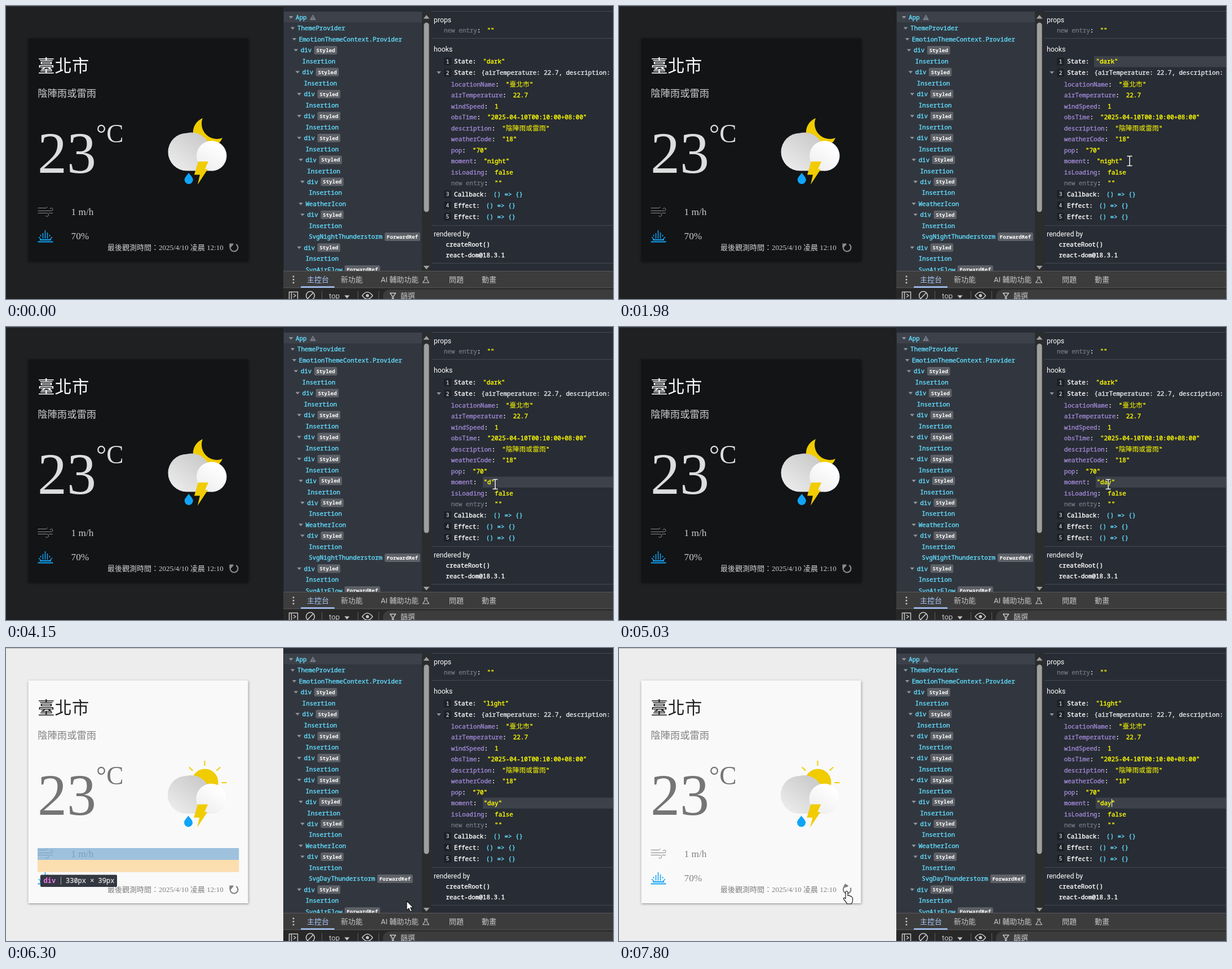
These frames come from a looping animation (1077 px wide and 520 px high, 8 s). An HTML page with a canvas:

```html
<!DOCTYPE html>
<html lang="zh-Hant">
<head>
<meta charset="utf-8">
<style>
html, body { margin: 0; width: 100%; height: 100%; overflow: hidden; background: #282c34; }
canvas { display: block; }
</style>
</head>
<body>
<canvas id="stage" width="1077" height="520"></canvas>
<script>
const g = document.getElementById('stage').getContext('2d');
g.lineJoin = 'round';
const LOOP = 8000;
const CJK = '"Noto Sans CJK TC", "Noto Sans CJK", sans-serif';
const MONO = `"Noto Sans Mono", "DejaVu Sans Mono", ${CJK}, monospace`;
const SERIF = `"Liberation Serif", ${CJK}, serif`;
const UI = `Roboto, ${CJK}`;
const CHAR = 6.54, CYAN = '#61dafb', YELLOW = '#ffff00', BLUE = '#10a4f8', SUN = '#f0cc00';

const themes = {
  dark: { page: '#1f2022', card: '#121416', shadow: '#0e0f11', title: '#f9f9fa', desc: '#cccccc',
    temp: '#dddddd', edge: '#3a3b3d', icon: '#8c8c8c' },
  light: { page: '#ededed', card: '#f9f9f9', shadow: '#888888', title: '#212121', desc: '#828282',
    temp: '#757575', edge: '#b5b5b5', icon: '#828282' }
};

function rect(x, y, w, h, color, r = 0) {
  g.fillStyle = color;
  g.beginPath();
  g.roundRect(x, y, w, h, r);
  g.fill();
}
function circle(x, y, r, color) {
  g.fillStyle = color;
  g.beginPath();
  g.arc(x, y, r, 0, 7);
  g.fill();
}
function fill(d, color) { g.fillStyle = color; g.fill(new Path2D(d)); }
function stroke(d, color, width = 1) {
  g.strokeStyle = color;
  g.lineWidth = width;
  g.stroke(new Path2D(d));
}
function text(s, x, y, font, color) {
  g.font = font;
  g.fillStyle = color;
  g.fillText(s, x, y);
}
// Code text centred on a row, thickened to a medium weight; Chinese runs are slightly larger.
function mono(s, x, cy, color, weight = 400, size = 10.9) {
  for (const run of s.split(/([\u3000-\u9fff]+)/)) {
    const wide = run.charCodeAt(0) > 0x2fff, y = cy + size * 0.36;
    text(run, x, y, `${weight} ${wide ? size * 1.09 : size}px ${MONO}`, color);
    if (weight === 400 && !wide) {
      g.strokeStyle = color;
      g.lineWidth = 0.4;
      g.strokeText(run, x, y);
    }
    x += g.measureText(run).width;
  }
  return x;
}
const toggle = (x, y) => fill(`M${x - 3.8} ${y - 2}h7.6l-3.8 4.4z`, '#8f949d');

function gradient(x0, y0, x1, y1, from, to) {
  const paint = g.createLinearGradient(x0, y0, x1, y1);
  paint.addColorStop(0, from);
  paint.addColorStop(1, to);
  return paint;
}

function drawWeather(day) {
  g.save();
  if (day) {
    circle(353, 238, 23.5, SUN);
    for (const a of [-135, -90, -45, 0]) {
      const c = Math.cos(a * Math.PI / 180), s = Math.sin(a * Math.PI / 180);
      stroke(`M${352.5 + 30 * c} ${239 + 30 * s}L${352.5 + 39 * c} ${239 + 39 * s}`, SUN, 2);
    }
    g.translate(-0.7, 1.5);
  } else {
    fill('M349 199A27 27 0 1 0 384 234A27 27 0 0 1 349 199Z', SUN);
  }
  fill('M321 225.5a33.5 33.5 0 0 0 0 67h40v-45a33.5 33.5 0 0 0-40-22z',
    gradient(300, 285, 340, 232, '#eaeaea', '#cdcdcd'));
  circle(364.8, 266, 26.7, gradient(350, 288, 376, 246, '#efefef', '#ffffff'));
  fill('M341 276h18l-6 13.5h5L340 317l4-17.500h-10z', SUN);
  fill('M324.300 296c3 4.500 7.500 8 7.500 12.500a7.500 7.500 0 0 1-15 0c0-4.500 4.500-8 7.500-12.500z', BLUE);
  g.restore();
}

function drawRefresh(angle, color) {
  g.save();
  g.translate(404.7, 428.7);
  g.rotate(angle);
  g.strokeStyle = color;
  g.lineWidth = 2.2;
  g.beginPath();
  g.arc(0, 0, 6.8, -1, 3.5);
  g.stroke();
  fill('M-8.300-7.300h7v2l-4.500 5h-2.500z', color);
  g.restore();
}

function drawApp(t, day) {
  const c = day ? themes.light : themes.dark;
  rect(0, 0, 492, 520, c.page);
  rect(0, 0, 492, 1, c.edge);
  g.save();
  g.shadowColor = c.shadow;
  g.shadowBlur = 4;
  g.shadowOffsetY = 1;
  rect(39.5, 57.5, 390, 395.5, c.card);
  g.restore();

  text('臺北市', 56.3, 117, `300 30.3px ${CJK}`, c.title);
  text('陰陣雨或雷雨', 56.3, 161, `300 17.3px ${CJK}`, c.desc);
  text('23', 56, 296, `104px ${SERIF}`, c.temp);
  text('°C', 160, 242, `45.5px ${SERIF}`, c.temp);
  drawWeather(day);

  stroke('M56.500 358.500h15M56.500 363.500h24a2.500 2.500 0 1 0-2.500-3M73 356a2.500 2.500 0 0 1-1.500 2.500' +
    'M56.500 367.500h16a3 3 0 1 1-2.500 4.500M76 367.500h7', c.icon, 1);
  text('1 m/h', 115.5, 371, `17.3px ${SERIF}`, c.desc);
  stroke('M56.500 418.500h27M60 415h20', BLUE, 1.8);
  stroke('M61.500 406v3M65.500 403v10M69.500 398v15M73.500 402v11M77.500 406v3M58 410l4 4M82 410l-4 4', BLUE, 1.5);
  text('70%', 115.5, 414, `17.3px ${SERIF}`, c.desc);
  text('最後觀測時間：2025/4/10 凌晨 12:10', 180, 433.3, `13px ${SERIF}`, c.desc);
  drawRefresh(t < 7590 ? 0 : Math.min(3, Math.floor((t - 7590) / 70)) * 0.17, c.icon);

  if (t >= 6300 && t < 6640) drawInspector();
}

function drawInspector() {
  rect(56, 355, 357.3, 21, 'rgba(120,170,210,.7)');
  rect(56, 376, 357.3, 21.5, 'rgba(255,155,0,.3)');
  rect(61, 402.5, 136, 21.5, '#333740', 2);
  mono('div', 66.5, 413, '#ee78e6', 700, 12);
  rect(97, 406, 1, 14, '#aaaaaa');
  mono('330px × 39px', 106, 413, '#d7d7d7', 400, 12);
}

// Depth and label of every tree row; "+" marks a styled element.
function treeRows(day) {
  return [[0, 'App'], [1, 'ThemeProvider'], [2, 'EmotionThemeContext.Provider'],
    [3, 'div+'], [4, 'Insertion'], [4, 'div+'], [5, 'Insertion'], [5, 'div+'], [6, 'Insertion'],
    [5, 'div+'], [6, 'Insertion'], [5, 'div+'], [6, 'Insertion'], [6, 'div+'], [7, 'Insertion'],
    [7, 'div+'], [8, 'Insertion'], [6, 'WeatherIcon'], [7, 'div+'], [8, 'Insertion'],
    [8, day ? 'SvgDayThunderstorm' : 'SvgNightThunderstorm'],
    [5, 'div+'], [6, 'Insertion'], [6, 'SvgAirFlow']];
}

function badge(label, x, cy) {
  rect(x, cy - 7.5, label.length * 5.6 + 7, 15, '#5e6167', 2.5);
  mono(label, x + 3.7, cy, '#ffffff', 600, 9.25);
}

function drawTree(day) {
  rect(492, 0, 247, 470, '#282c34');
  rect(493, 10, 245, 19.5, '#3d424a');
  rect(493, 29.5, 245, 441, '#32373f');
  treeRows(day).forEach(([depth, label], i) => {
    const x = 514 + depth * 2.9, cy = 20 + i * 19.47, name = label.replace('+', '');
    const svg = name.startsWith('Svg');
    if (name !== 'Insertion' && !svg) toggle(x - 8.3, cy);
    const end = mono(name, x, cy, CYAN);
    if (label !== name) badge('Styled', end + 4.5, cy);
    if (svg) badge('ForwardRef', end + 4, cy);
  });
  fill('M544.500 15l5.500 10h-11z', '#777d88');
  rect(544, 18.5, 1, 3.5, '#3d424a');
  rect(544, 23, 1, 1, '#3d424a');

  rect(738, 10, 17, 460, '#2b2c2e');
  rect(741.5, 29.5, 9, 336, '#9f9f9f', 4.5);
  fill('M746 16l5.500 6.500h-11z', '#9f9f9f');
  fill('M746 467.500l5.500-6.500h-11z', '#9f9f9f');
}

function momentText(t) {
  if (t < 4150) return 'night';
  return t < 4300 ? 'd' : t < 4500 ? 'da' : 'day';
}

function drawHooks(t) {
  rect(755, 0, 322, 470, '#282c34');
  for (const y of [9, 57, 389, 456]) rect(755, y, 322, 1, '#454a53');
  for (const [s, y] of [['props', 29], ['hooks', 81], ['rendered by', 408.5]])
    text(s, 759, y, `12.3px ${UI}`, '#ffffff');

  const entry = (name, x, cy, color, value, gap = 12) => {
    mono(name, x, cy, color);
    mono(':', x + name.length * CHAR, cy, '#ffffff');
    mono(value, x + (name.length + 1) * CHAR + gap, cy, YELLOW);
  };
  const hook = (n, name, cy, value, gap, color) => {
    rect(777, cy - 7, 13, 14, '#1d2027', 2);
    mono(String(n), 780.7, cy, '#c0c4cc', 400, 9.2);
    mono(name + ':', 795, cy, '#ffffff');
    mono(value, 795 + (name.length + 1) * CHAR + gap, cy, color);
  };

  if (t >= 1090 && t < 2180) rect(843, 89, 234, 19.5, '#3d424a');
  if (t >= 2180) rect(846, 265.5, 231, 19.5, '#3d424a');
  if (t >= 3150 && t < 4150) rect(855, 268, 32.5, 14, '#3367d1');

  entry('new entry', 777, 43.5, '#6d7380', '""', 11);
  hook(1, 'State', 98.5, t < 5830 ? '"dark"' : '"light"', 12, YELLOW);
  toggle(768, 118);
  hook(2, 'State', 118.5, '{airTemperature: 22.7, description:', 9, '#e4e7ec');
  [['locationName', '"臺北市"'], ['airTemperature', '22.7'], ['windSpeed', '1'],
    ['obsTime', '"2025-04-10T00:10:00+08:00"'], ['description', '"陰陣雨或雷雨"'],
    ['weatherCode', '"18"'], ['pop', '"70"'], ['moment', `"${momentText(t)}"`],
    ['isLoading', 'false'], ['new entry', '""']
  ].forEach(([name, value], i) =>
    entry(name, 789.7, 139 + i * 19.5, name === 'new entry' ? '#6d7380' : '#9d87d2', value));
  hook(3, 'Callback', 334, '() => {}', 11, CYAN);
  hook(4, 'Effect', 354, '() => {}', 11, CYAN);
  hook(5, 'Effect', 374, '() => {}', 11, CYAN);
  mono('createRoot()', 780.5, 423, '#ffffff');
  mono('react-dom@18.3.1', 780.5, 442.5, '#ffffff');

  if (t >= 4500 && Math.floor((t - 4500) / 530) % 2 === 0) rect(874, 268, 1, 14, '#ffffff');
}

function drawDrawer() {
  const grey = '#c7c7c7';
  rect(492, 470, 585, 30, '#3c3c3c');
  rect(492, 470, 585, 1, '#5a5a5a');
  rect(492, 500, 585, 20, '#282828');
  rect(492, 499.5, 585, 1, '#5a5a5a');
  for (const y of [480, 485.5, 491]) circle(510, y, 1.5, grey);
  [['主控台', 534], ['新功能', 594], ['AI 輔助功能', 665], ['問題', 786], ['動畫', 844]].forEach(([s, x], i) =>
    text(s, x, 490, `13px ${UI}`, i ? grey : '#a8c7fa'));
  rect(523, 497.5, 60, 2.5, '#a8c7fa', 1);
  stroke('M742 481h6M743.500 481v4l-4 6h11l-4-6v-4', grey, 1.2);

  stroke('M502.500 507.500h15v14h-15zM506.500 507v13M510 511l4 3-4 3', grey, 1.5);
  stroke('M547.500 514a7.500 7.500 0 1 1-15 0a7.500 7.500 0 1 1 15 0M535 519.500l10.500-11', grey, 1.6);
  rect(560, 506, 1, 14, '#5e5e5e');
  text('top', 573, 519, `13.3px ${UI}`, grey);
  fill('M600.500 513.500h9l-4.500 5.500z', grey);
  rect(624, 506, 1, 14, '#5e5e5e');
  stroke('M632 514q9-12.500 18.500 0q-9 12.500-18.500 0z', grey, 1.5);
  circle(641.3, 514, 2.8, grey);
  rect(661, 506, 1, 14, '#5e5e5e');
  rect(669, 503, 440, 30, '#3c3c3c', 12);
  stroke('M681.500 509.500h10l-4 5.500v5h-2v-5z', grey, 1.4);
  text('篩選', 700, 519, `13px ${UI}`, grey);
}

// Pointer moves: start, end, number of steps, shape, waypoints.
const moves = [
  [260, 690, 7, 'beam', [[946, 269], [935, 200], [896, 92]]],
  [1090, 1640, 8, 'beam', [[893, 87], [893, 92], [899, 190], [900, 268]]],
  [1840, 1980, 3, 'beam', [[900, 270], [906, 275]]],
  [2450, 2730, 5, 'beam', [[898, 277], [880, 282], [869, 279]]],
  [2930, 3000, 2, 'beam', [[866, 280], [862, 280]]],
  [3150, 3290, 3, 'beam', [[862, 280], [868, 279]]],
  [5960, 6100, 3, 'arrow', [[850, 288], [806, 326]]],
  [6300, 6770, 8, 'arrow', [[711, 449], [692, 438], [668, 396]]],
  [6840, 7050, 4, 'arrow', [[620, 401], [416, 424]]],
  [7120, 7260, 3, 'hand', [[409, 424], [404, 425]]],
  [7590, 7800, 4, 'hand', [[404, 428], [404, 432]]]
];

function along(points, p) {
  const at = p * (points.length - 1), i = Math.min(Math.floor(at), points.length - 2), f = at - i;
  return [0, 1].map(k => points[i][k] + (points[i + 1][k] - points[i][k]) * f);
}

function drawPointer(t) {
  const move = moves.findLast(m => t >= m[0]);
  if (!move) return;
  const [start, end, steps, shape, points] = move;
  const done = Math.min(1, (t - start) / (end - start));
  const [x, y] = along(points, Math.floor(done * (steps - 1) + 1e-6) / (steps - 1));
  g.save();
  g.translate(Math.round(x), Math.round(y));
  if (shape === 'beam') {
    const d = 'M-4.500-8.500h9M0-8.500v17M-4.500 8.500h9';
    stroke(d, '#202329', 3);
    stroke(d, '#ffffff', 1.5);
  } else {
    const d = shape === 'arrow'
      ? 'M0 0v16.500l3.800-3.600 2.700 6.100 2.800-1.200-2.700-6h5.200z'
      : 'M-2 1.500q0-2 2-2t2 2v6q3-1 4 1 2.500-.500 3 1.500 1.500 0 1.500 2v4q0 3-2 6h-8q-2-4-5-7-2-2.500-.500-3.500 1.500-.500 3 1.500z';
    fill(d, shape === 'arrow' ? '#ffffff' : '#f9f9f9');
    stroke(d, '#111111', 1.1);
  }
  g.restore();
}

function draw(now) {
  const t = now % LOOP, day = t >= 5360;
  drawApp(t, day);
  drawTree(day);
  drawHooks(t);
  drawDrawer();
  drawPointer(t);
  requestAnimationFrame(draw);
}
requestAnimationFrame(draw);
</script>
</body>
</html>
```
